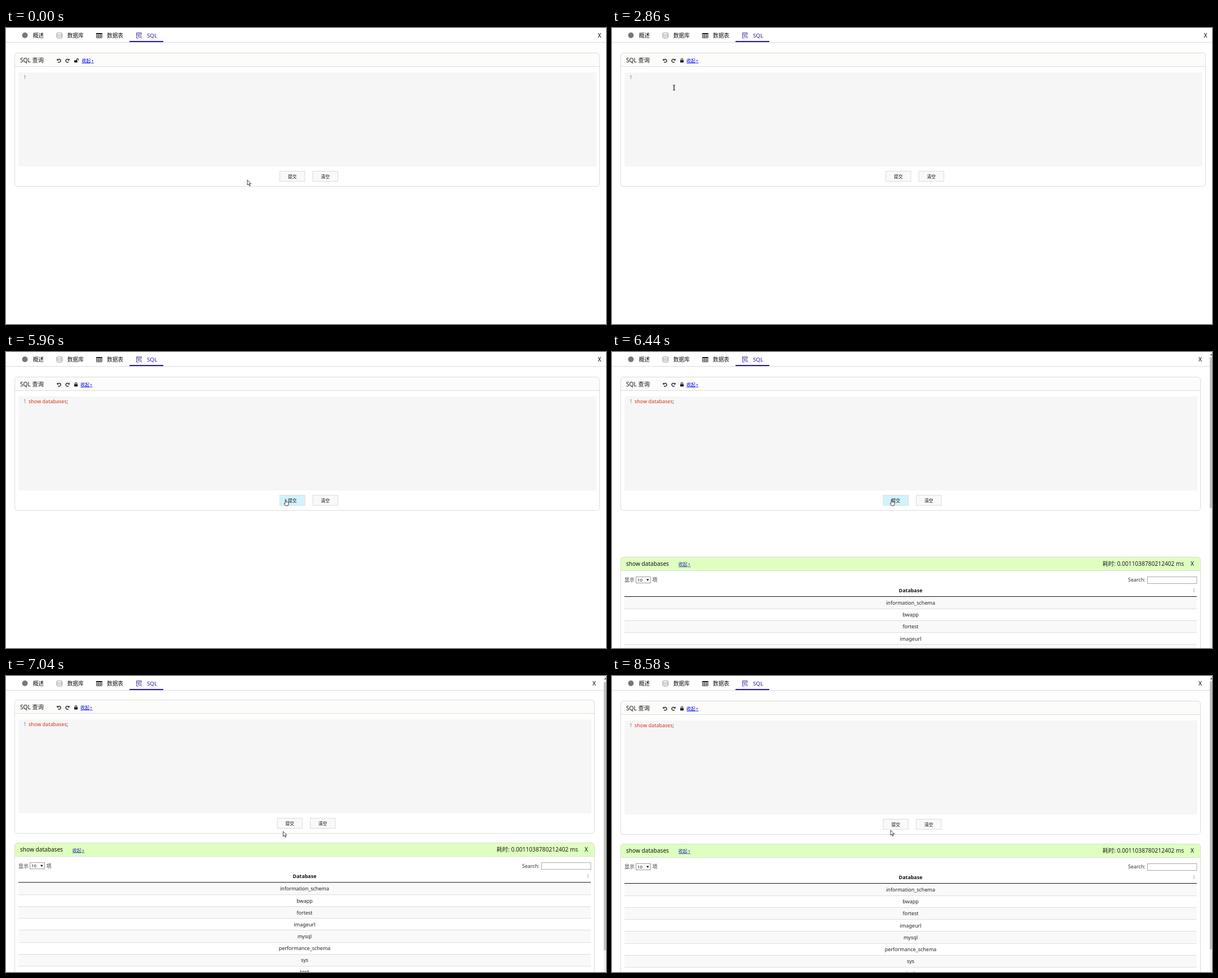
An HTML page for the animation above (8.74 s loop, 1064x526 px).

```html
<!DOCTYPE html>
<html lang="zh-CN">
<head>
<meta charset="utf-8">
<title>SQL 查询</title>
<style>
html, body { margin: 0; width: 100%; height: 100%; overflow: hidden; background: #fff; }
svg { display: block; font-family: "Noto Sans", "Noto Sans CJK SC", "Noto Sans CJK", sans-serif; }
.arrow { font-family: "DejaVu Sans Mono", monospace; }
</style>
</head>
<body>
<svg id="stage" width="1064" height="526" viewBox="0 0 1064 526"></svg>
<script>
const LOOP = 8740, PURPLE = '#2a1a96', LINE = '#dcdcdc', PANEL = 298.5;
const VIEW = 541, PAGE = 594, ROW = 190 / 9;
const stage = document.getElementById('stage');
const databases = ['information_schema', 'bwapp', 'fortest', 'imageurl', 'mysql',
  'performance_schema', 'sys', 'test', 'wallhaven'];

// Pointer hot spot: time, x, y
const pointer = [
  [380, 428, 270], [800, 300, 150], [1060, 222, 50], [1220, 238, 24], [1370, 238, 24],
  [1560, 253, 40], [1900, 170, 66], [2240, 124, 57], [2480, 124, 57], [2860, 110, 106],
  [3100, 110, 106], [3250, 112, 107], [3960, 112, 107], [4770, 461.5, 239], [4870, 461.5, 239],
  [5740, 496, 262], [6600, 496, 262], [6900, 491.5, 276], [8340, 491.5, 276],
  [8450, 493, 281], [8580, 494, 274]];

const clamp = v => Math.min(1, Math.max(0, v));
const ramp = (t, a, b) => clamp((t - a) / (b - a));
const smooth = u => u * u * (3 - 2 * u);

function along(keys, t) {
  let i = keys.findIndex(k => k[0] > t);
  if (i < 0) i = keys.length;
  const a = keys[Math.max(0, i - 1)], b = keys[Math.min(i, keys.length - 1)];
  const u = a === b ? 0 : ramp(t, a[0], b[0]);
  return [a[1] + (b[1] - a[1]) * u, a[2] + (b[2] - a[2]) * u];
}

const rect = (x, y, w, h, fill, more = '') =>
  `<rect x="${x}" y="${y}" width="${w}" height="${h}" fill="${fill}" ${more}/>`;
const path = (d, fill, more = '') => `<path d="${d}" fill="${fill}" ${more}/>`;
const stroke = (d, color, width = 1) => path(d, 'none', `stroke="${color}" stroke-width="${width}"`);
const group = (x, y, body) => `<g transform="translate(${x} ${y})">${body}</g>`;
// y is the middle of the capital letters
const text = (s, x, y, size = 9, fill = '#111', more = '') =>
  `<text x="${x}" y="${y + size * .36}" font-size="${size}" fill="${fill}" ${more}>${s}</text>`;
const middle = 'text-anchor="middle"';
const link = (x, y, color) => text('收起<tspan class="arrow" dx="0.6">↑</tspan>', x, y, 8, color,
  'text-decoration="underline"');

function card(top, height, right, head) {
  const w = right - 15.5;
  return rect(15.5, top, w, height, '#fff', 'rx="5"') +
    path(`M15.5 ${top + 24}v-19q0-5 5-5h${w - 10}q5 0 5 5v19z`, head) +
    stroke(`M15.5 ${top + 24}h${w}`, LINE) +
    rect(15.5, top, w, height, 'none', `stroke="${LINE}" rx="5"`);
}

function tabs(right) {
  const cylinder = 'M.5 2.2v7c0 2.4 9.5 2.4 9.5 0v-7M.5 4.6c0 2.2 9.5 2.2 9.5 0M.5 6.9c0 2.2 9.5 2.2 9.5 0' +
    'M.5 2.2c0-2.2 9.5-2.2 9.5 0s-9.5 2.2-9.5 0';
  return rect(0, 0, 1064, 25, '#fff') + rect(0, 25, 1064, 1, LINE) +
    '<circle cx="33.5" cy="13" r="5" fill="#777"/>' + text('概述', 47.7, 13.5, 9.7) +
    group(89.5, 7.5, stroke(cylinder, '#888899', .8)) + text('数据库', 108.7, 13.5, 9.7) +
    group(160, 9, rect(0, 0, 10.5, 2, '#111') +
      stroke('M.4 0v8.6h9.7V0M0 4.2h10.5M0 6.4h10.5M3.6 2v6.6M7 2v6.6', '#222', .8)) +
    text('数据表', 179, 13.5, 9.7) +
    group(231, 8, stroke('M9 4V.5H.5v9.5H4M.5 2.7H9M2 4.8h3M2 6.8h2', PURPLE, .8) +
      `<circle cx="6.6" cy="6.8" r="1.9" fill="none" stroke="${PURPLE}" stroke-width=".8"/>` +
      stroke('M8 8.2l2 2', PURPLE, .9)) +
    text('SQL', 250, 13.5, 9.7, PURPLE) + rect(219, 23, 60, 2, PURPLE) +
    text('X', right, 13.3, 10.2, '#000', middle);
}

function query(t, right, shift) {
  const locked = t >= 2400, pasted = t >= 3910;
  const turn = stroke('M-2 -1.5A2.8 2.8 0 1 1 -1.8 2.2', '#111', 1.3) + path('M-3.6 -3.6v3.4h3.4z', '#111');
  const hover = clamp(ramp(t, 5500, 5800) - ramp(t, 6780, 6980));
  const tint = [249 - 41 * hover, 249 - 6 * hover, 249 + 6 * hover].map(Math.round);
  const button = (x, label, fill) => rect(x + .5, 254.5, 44.5, 18, fill, `stroke="${LINE}"`) +
    text(label, x + 22.7, 264, 7.8, '#111', middle);
  // The caret blinks every 530 ms, restarting with the pasted text
  const since = pasted ? t - 3910 : t - 3180;
  const caret = t >= 3180 && t < 5860 && Math.floor(since / 530) % 2 === 0;
  return card(44.5, 237, right, '#fcfcfa') +
    text('SQL 查询', 25, 57, 10.2) +
    group(94, 58, turn) + group(109, 58, `<g transform="scale(-1 1)">${turn}</g>`) +
    rect(121, 57.3, locked ? 6 : 5.5, 4, '#111', 'rx=".6"') +
    stroke(locked ? 'M122.3 57.5v-1.3a1.7 1.7 0 0 1 3.4 0v1.3' : 'M125.3 57.5v-1.3a1.6 1.6 0 0 1 3.2 0v1.3', '#111', 1.1) +
    link(locked ? 132 : 134.3, 58, '#0000ee') +
    rect(22, 79, right - 27.5, 167, '#f6f6f6') + text('1', 31, 87.4, 9, '#789') +
    (pasted ? text('show databases<tspan fill="#333">;</tspan>', 40, 87.4, 9, '#d7301a') : '') +
    (caret ? rect(pasted ? 110 : 40, 81, 1, 12, '#111') : '') +
    button(485 - shift, '提交', `rgb(${tint})`) + button(543.5 - shift, '清空', '#f9f9f9');
}

function result(right) {
  const inner = right - 6.5, mid = 529.5, w = inner - 22;
  const rows = databases.map((name, i) => {
    const y = 369 + i * ROW;
    return rect(22, y, w, ROW, i % 2 ? '#fff' : '#f9f9f9') +
      (i ? rect(22, Math.round(y), w, 1, LINE) : '') + text(name, mid, y + 11, 9, '#222', middle);
  }).join('');
  return card(PANEL, 291, right, '#dfffc0') +
    text('show databases', 25, 310.5, 10.1) + link(117.8, 311.5, '#1428b0') +
    text('耗时: 0.0011038780212402 ms', 1014.5, 310.5, 10.2, '#222', 'text-anchor="end"') +
    text('X', 1029, 310.5, 10.2, '#111', middle) +
    text('显示', 22, 339.2, 9, '#333') + rect(42.5, 333.5, 26, 11, '#fff', 'stroke="#999"') +
    text('10', 45, 339.3, 7.8) + path('M61 337.5h4.6l-2.3 3.6z', '#111') + text('项', 71.5, 339.2, 9, '#333') +
    text('Search:', 915, 339.2, 9, '#333') + rect(949.5, 333.5, 87.5, 12, '#fff', 'stroke="#a9a9a9"') +
    text('Database', mid, 357.3, 8.9, '#111', 'text-anchor="middle" font-weight="700"') +
    path('M1030 356.7h4l-2-3.2zM1030 358.2h4l-2 3.2z', '#ccc') +
    rows + rect(22, 368, w, 1, '#111') + rect(22, 558, w, 1, '#111') +
    text('上一页', 929, 572.5, 9, '#666') + text('下一页', 1001.5, 572.5, 9, '#666') +
    rect(966.5, 561.5, 24, 22, 'url(#page)', 'stroke="#979797" rx="1"') + text('1', 978.5, 572.5, 9, '#333', middle);
}

function scrollbar(offset, scroll) {
  const track = VIEW - 18, page = PAGE + 7 * offset;
  return rect(1060, 0, 4, 526, '#f1f1f1') + path('M1061 6l2-3 1 1.5v1.5z', '#555') +
    rect(1060, 9.5 + scroll * track / page, 4, VIEW * track / page, '#c1c1c1');
}

function cursor(t, scroll) {
  const [x, y] = along(pointer, t);
  const typing = t < 6000 && y > 79 && y < 246;
  const onLink = x > 119 && x < 158 && y > 52 && y < 64;
  const onButton = t > 5000 && x > 485 && x < 530 && y > 254 && y < 273;
  if (typing) return group(x, y, stroke('M-2 -4.5h1.4q.6 0 .6.6v7.8q0 .6-.6.6H-2M2 -4.5H.6Q0-4.5 0-3.9v7.8q0 .6.6.6H2', '#222', .9));
  const hand = 'M-.8 .4q.9-1 1.6 0v4l1.2-.3 1.3.5 1.2.4.5 1v2.2l-.9 2.8h-4.4l-2.4-3.6q-.2-1.5 1.9-.4z';
  const tip = 'M0 0v9l2.1-1.9 1.5 3.5 1.5-.6-1.5-3.4h2.9z';
  const hot = onLink || onButton;
  return group(x, y, path(hot ? hand : tip, '#fff', 'stroke="#111" stroke-width=".8" stroke-linejoin="round"'));
}

function draw(t) {
  const narrow = t >= 6000, right = narrow ? 1043.5 : 1052.5;
  const offset = 228 * (1 - ramp(t, 6320, 6620)) ** 2.4;
  const scroll = 53 * (smooth(ramp(t, 7010, 7290)) - smooth(ramp(t, 7630, 7820)));
  return '<defs><linearGradient id="page" x2="0" y2="1"><stop stop-color="#fff"/>' +
    '<stop offset="1" stop-color="#dcdcdc"/></linearGradient></defs>' +
    group(0, -scroll, query(t, right, narrow ? 4.5 : 0) +
      (t >= 6320 ? group(0, offset, result(right)) : '')) +
    tabs(narrow ? 1043 : 1052.5) + (narrow ? scrollbar(offset, scroll) : '') + cursor(t, scroll);
}

let shown = '';
const start = performance.now();
function tick() {
  const next = draw((performance.now() - start) % LOOP);
  if (next !== shown) stage.innerHTML = shown = next;
  requestAnimationFrame(tick);
}
tick();
</script>
</body>
</html>
```
